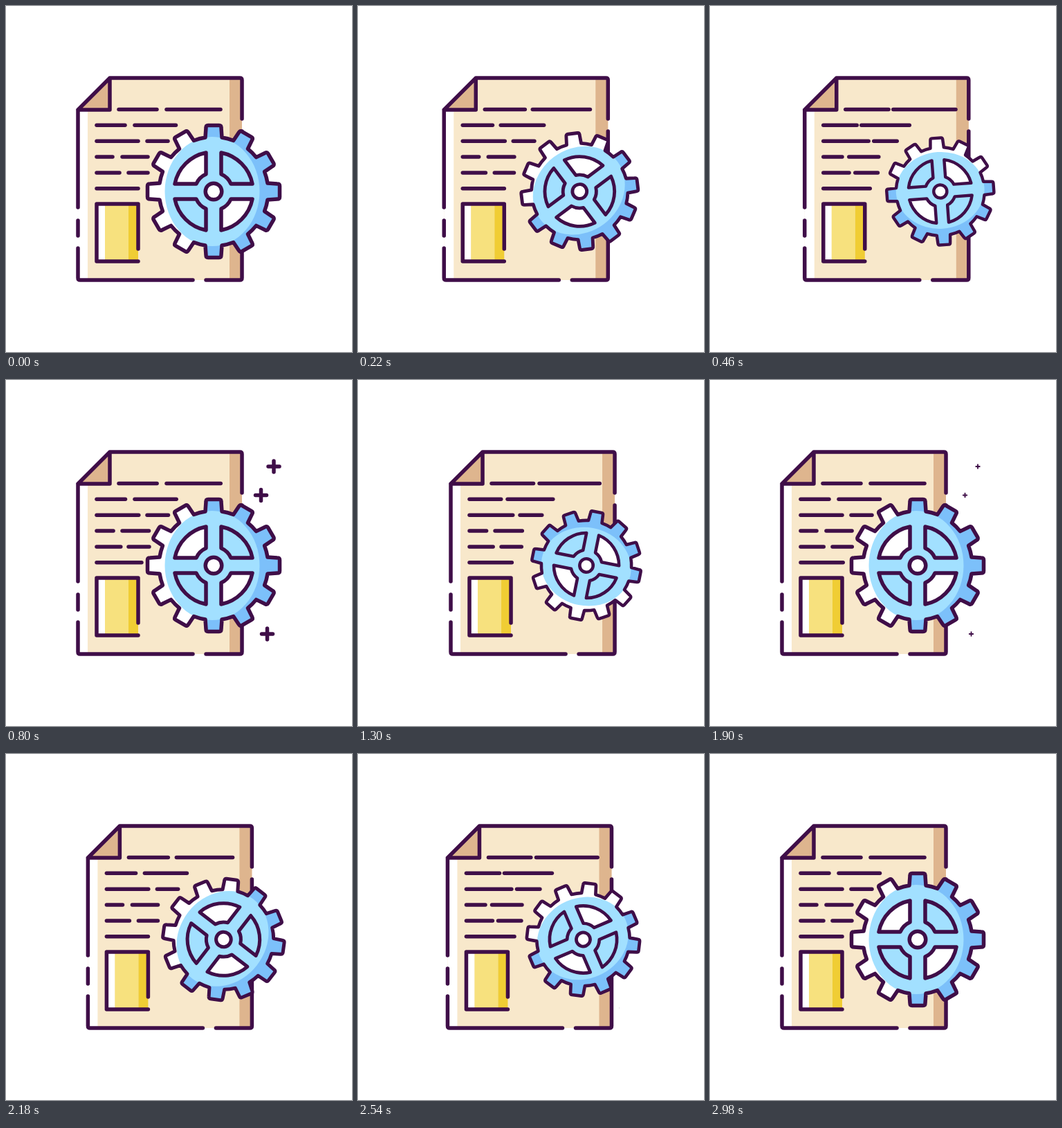
Write an HTML page that moves like this. It is 500 by 500 pixels and loops after 3000 ms.

```html
<!DOCTYPE html>
<html lang="en">
<head>
<meta charset="utf-8">
<title>Document and gear</title>
<style>
  html, body { margin: 0; width: 100%; height: 100%; overflow: hidden; background: #fff; }
  svg { display: block; width: 100vw; height: 100vh; }
  .ink { fill: none; stroke: #3f0e48; stroke-width: 5.5; stroke-linecap: round; stroke-linejoin: round; }
</style>
</head>
<body>
<svg viewBox="0 0 500 500">
  <defs><clipPath id="gearClip"><path class="gearShape"/></clipPath></defs>

  <g id="page">
    <path fill="#f8e8cb" d="M104 150L150 104H338Q341 104 341 107V393Q341 396 338 396H107Q104 396 104 393Z"/>
    <path fill="#fff" d="M104 150H118V396H107Q104 396 104 393Z"/>
    <path fill="#deb58e" d="M323 104H338Q341 104 341 107V393Q341 396 338 396H323ZM104 150L150 104V150Z"/>
    <path class="ink" d="M104 291V150H150V104L104 150M150 104H338Q341 104 341 107V163
      M341 181V393Q341 396 338 396H289M270 396H107Q104 396 104 393V350M104 310V332"/>
    <path fill="#fff" d="M131 286H143V369H131Z"/>
    <path fill="#f7e17e" d="M143 286H177V369H143Z"/>
    <path fill="#f0cd34" d="M177 286H191V369H177Z"/>
    <path class="ink" d="M191 351V286H131V369H191"/>
    <g id="rows"></g>
  </g>

  <g id="gear">
    <g clip-path="url(#gearClip)">
      <path fill="#fff" d="M-100-100H100V100H-100Z"/>
      <path fill="#7cc0fa" d="M-14-100H100V100H-14Z"/>
      <ellipse cx="-2" rx="68.5" ry="79" fill="#a2e0ff"/>
    </g>
    <path class="gearShape ink"/>
    <g id="holes"></g>
    <circle class="ink" r="11.8" style="fill:#fff"/>
  </g>

  <g id="sparks"></g>
</svg>
<script>
const $ = id => document.getElementById(id);

function add(parent, attrs) {
  const el = document.createElementNS('http://www.w3.org/2000/svg', 'path');
  for (const key in attrs) el.setAttribute(key, attrs[key]);
  return parent.appendChild(el);
}

// Ease-in-out, cubic-bezier(.42, 0, .58, 1)
function ease(u) {
  if (u <= 0) return 0;
  if (u >= 1) return 1;
  let lo = 0, hi = 1, s = 0.5;
  for (let i = 0; i < 22; i++) {
    s = (lo + hi) / 2;
    const x = 3 * s * (1 - s) * (0.42 * (1 - s) + 0.58 * s) + s ** 3;
    if (x < u) lo = s; else hi = s;
  }
  return s * s * (3 - 2 * s);
}

// Rises for 0.4 from start, then falls for 0.4
const swing = (phase, start) => ease(1 - Math.abs(phase - start - 0.4) / 0.4);

function gearPath() {
  let d = '';
  for (let k = 0; k < 12; k++) {
    const a = k * Math.PI / 6, c = Math.cos(a), s = Math.sin(a);
    const p = (x, y) => `${(x * c - y * s).toFixed(2)} ${(x * s + y * c).toFixed(2)} `;
    d += (k ? 'A79 79 0 0 1 ' : 'M') + p(-12, -78) +
      'L' + p(-11, -92) + 'Q' + p(-11, -95.5) + p(-8, -95.5) +
      'L' + p(8, -95.5) + 'Q' + p(11, -95.5) + p(11, -92) + 'L' + p(12, -78);
  }
  return d + 'A79 79 0 0 1 -12 -78Z';
}

document.querySelectorAll('.gearShape').forEach(el => el.setAttribute('d', gearPath()));

for (let k = 0; k < 4; k++) {
  add($('holes'), {
    class: 'ink',
    d: 'M-11-56A57 57 0 0 0 -56-11H-25A27.3 27.3 0 0 1 -11-25Z',
    style: `fill:${k % 2 ? '#a2e0ff' : '#fff'}`,
    transform: `rotate(${k * 90})`
  });
}

// Each dash: start, end, growth
const rows = [
  [[163, 218, 7.3], [232, 310, 12.3]],
  [[131, 172, 7.5], [186, 245.5, 10]],
  [[131, 191, 5.5], [204, 234, 3.5]],
  [[131, 154, 4.5], [168, 205, 6.5]],
  [[131, 164, 5], [177, 205, 5.5]],
  [[131, 191, 10]]
];
const dashes = rows.flatMap((row, i) => row.map(([from, to, grow]) => ({
  from, to, grow, y: 149.5 + i * 22.85, start: 0.04 + i * 0.032,
  el: add($('rows'), { class: 'ink' })
})));

const sparks = [[387, 125, 0.55], [368.5, 166.5, 0.575], [377.5, 367, 0.52]].map(([x, y, start]) => ({
  x, y, start, el: add($('sparks'), { class: 'ink', d: 'M-8 0H8M0-8V8' })
}));

function draw(ms) {
  const cycle = Math.floor(ms / 1000) % 3;
  const phase = ms % 1000 / 1000;
  const v = swing(phase, 0);
  const shift = 34.4 * v;
  const turn = (cycle === 1 ? -90 : 90) * v;

  $('page').setAttribute('transform', `translate(${shift} 0)`);
  $('gear').setAttribute('transform',
    `translate(${300 + shift} 268) rotate(${turn}) scale(${1 - 0.2 * v})`);

  for (const { el, from, to, grow, y, start } of dashes)
    el.setAttribute('d', `M${from} ${y}H${to + grow * swing(phase, start)}`);

  for (const { el, x, y, start } of sparks) {
    const size = ease((phase - start) / 0.21) * (1 - ease((phase - 0.8) / 0.17));
    el.setAttribute('visibility', size > 0.01 ? 'visible' : 'hidden');
    el.setAttribute('transform', `translate(${x} ${y}) scale(${size})`);
  }
}

const began = performance.now();
function tick() {
  draw((performance.now() - began) % 3000);
  requestAnimationFrame(tick);
}
draw(0);
requestAnimationFrame(tick);
</script>
</body>
</html>
```
